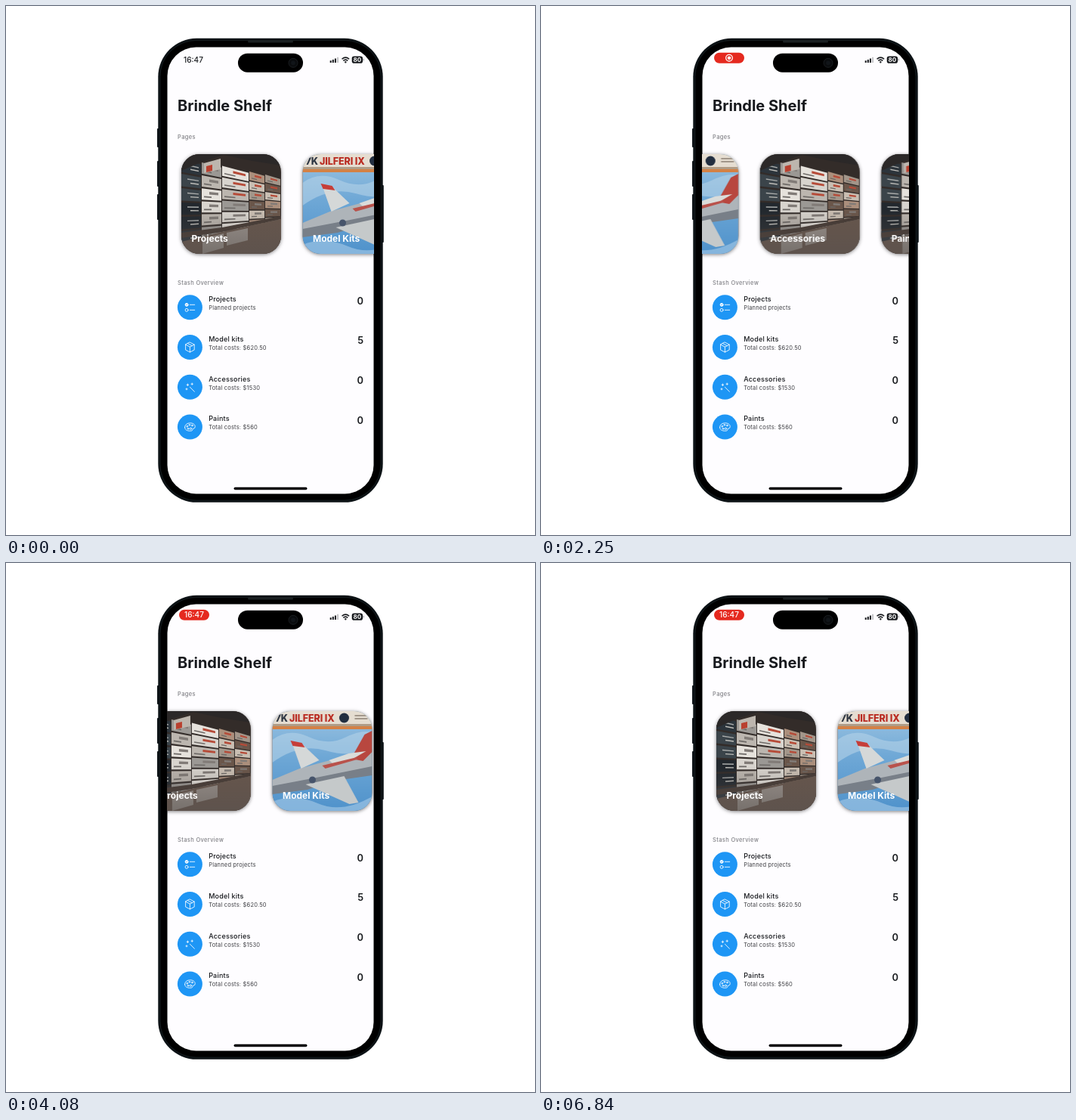
An HTML page that plays this animation: 700 px wide and 700 px high, repeating every 6870 ms.

```html
<!DOCTYPE html>
<html lang="en">
<head>
<meta charset="utf-8">
<title>Phone library carousel</title>
<style>
  html, body { margin: 0; width: 100%; height: 100%; overflow: hidden; background: #fff; }
  svg { display: block; width: 100vw; height: 100vh; }
  text { font-family: Inter, Roboto, sans-serif; fill: #17191d; }
  .title { font-size: 20px; font-weight: 700; }
  .section { font-size: 7.5px; font-weight: 500; letter-spacing: .36px; fill: #828287; }
  .name { font-size: 9px; font-weight: 500; letter-spacing: .2px; }
  .sub { font-size: 7.5px; letter-spacing: .2px; fill: #3e3f43; }
  .count { font-size: 12.8px; font-weight: 600; text-anchor: end; }
  .label { font-size: 12px; font-weight: 700; fill: #fff; }
  .clock { font-size: 10px; font-weight: 500; text-anchor: middle; }
  .icon { fill: none; stroke: #fff; stroke-width: .85; stroke-linecap: round; stroke-linejoin: round; }
  .shadow { filter: drop-shadow(0 1px 2.5px rgba(0, 0, 0, .5)); }
  .box-title { font-size: 12.5px; font-weight: 800; letter-spacing: -.1px; fill: #b92a20; }

  #strip, .before, .pill, .rec, .after { animation: 6870ms linear infinite both; }
  #strip { animation-name: scroll; }
  .before { animation-name: leave; }
  .pill { animation-name: enter; }
  .rec { animation-name: recOut; }
  .after { animation-name: timeIn; }

  @keyframes scroll {
    0%, 20.4% { transform: translateX(0); animation-timing-function: cubic-bezier(.4, 0, .7, .8); }
    32.75% { transform: translateX(-263px); animation-timing-function: cubic-bezier(.3, .5, .6, .9); }
    40.61% { transform: translateX(-356.5px); animation-timing-function: ease-out; }
    43.7% { transform: translateX(-364px); animation-timing-function: cubic-bezier(.5, 0, .7, .6); }
    52.84% { transform: translateX(-202.5px); animation-timing-function: cubic-bezier(.3, .45, .4, 1); }
    66%, 100% { transform: translateX(0); }
  }
  @keyframes leave { 0%, 6.5% { opacity: 1; } 8.5%, 100% { opacity: 0; } }
  @keyframes enter { 0%, 6.5% { opacity: 0; } 8.5%, 100% { opacity: 1; } }
  @keyframes recOut { 0%, 46% { opacity: 1; } 48%, 100% { opacity: 0; } }
  @keyframes timeIn { 0%, 46% { opacity: 0; } 48%, 100% { opacity: 1; } }
</style>
</head>
<body>
<svg viewBox="0 0 700 700">
  <defs>
    <clipPath id="screen"><rect x="213.5" y="54.5" width="273" height="591" rx="38"/></clipPath>
    <clipPath id="card"><rect width="132" height="132" rx="24"/></clipPath>
    <linearGradient id="shade" x2="0" y2="1">
      <stop offset=".55" stop-color="#55504e" stop-opacity="0"/>
      <stop offset="1" stop-color="#55504e" stop-opacity=".5"/>
    </linearGradient>
    <linearGradient id="sky" x2="0" y2="1">
      <stop offset="0" stop-color="#9dc4e2"/>
      <stop offset=".45" stop-color="#6fa8d6"/>
      <stop offset="1" stop-color="#4f92cb"/>
    </linearGradient>

    <g id="shelf">
      <rect width="132" height="132" fill="#332c29"/>
      <g id="boxes"></g>
      <path d="M0 0H132V15L94 9 56 1 28 10 0 22Z" fill="#2b2828"/>
      <path d="M30 12L52 6V20L30 25Z" fill="#bdb6ae"/>
      <path d="M33 16L41 14V22L33 24Z" fill="#b9402f"/>
      <path d="M0 116L58 102 132 86V132H0Z" fill="#67564c"/>
      <path d="M0 104L54 97 132 82V86L54 103 0 111Z" fill="#463a34"/>
      <path d="M28 112L56 105V124L28 132ZM60 104L88 98V114L60 121Z" fill="#99918b"/>
      <rect width="132" height="132" fill="url(#shade)"/>
    </g>

    <g id="jet">
      <rect width="132" height="132" fill="url(#sky)"/>
      <path d="M0 38Q22 22 48 34T96 35 132 28V50Q104 62 70 52T0 68Z" fill="#b5d2e8" opacity=".6"/>
      <path d="M0 120Q28 108 60 122T132 113V132H0Z" fill="#9cc4e4" opacity=".7"/>
      <path d="M0 91L36 76 91 61 132 52V83L88 88 48 101 0 108Z" fill="#aeb4b9"/>
      <path d="M0 99L58 88 132 73V85L90 91 46 104 0 110Z" fill="#787f88"/>
      <path d="M26 42L40 44 62 65 38 76Z" fill="#d5d8d8"/>
      <path d="M24 39L39 42 43 48 27 46Z" fill="#c63e39"/>
      <path d="M44 97L95 86 114 121 102 123Z" fill="#c5c9ca"/>
      <path d="M104 63L122 31 132 26V54L120 66Z" fill="#b8473f"/>
      <path d="M75 65L101 56 124 53 105 64 82 71Z" fill="#dadcda"/>
      <path d="M66 72L112 61V64L70 76Z" fill="#b9524b"/>
      <circle cx="53" cy="91" r="4.5" fill="#46546b"/>
      <rect width="132" height="18" fill="#e5ddd1"/>
      <rect y="17" width="132" height="3" fill="#af9c87"/>
      <rect y="20" width="132" height="4" fill="#d38146"/>
      <text x="4" y="14" font-size="12.5" font-weight="800" style="fill:#2d3542">7K</text>
      <text class="box-title" x="22.5" y="14">JILFERI IX</text>
      <circle cx="95" cy="9" r="6.5" fill="#222e40"/>
      <path d="M109 6H126M109 10H126" stroke="#8d8175" stroke-width="1.4"/>
    </g>
  </defs>

  <!-- phone body -->
  <g fill="#11171b">
    <rect x="200" y="162" width="3" height="25" rx="1"/>
    <rect x="200" y="205" width="3" height="34" rx="1"/>
    <rect x="200" y="249" width="3" height="34" rx="1"/>
    <rect x="497" y="237" width="2.8" height="76" rx="1"/>
  </g>
  <rect x="201.3" y="42.8" width="297.4" height="614" rx="51" fill="#0c1215"/>
  <rect x="204" y="45.5" width="292" height="608.6" rx="48" fill="#000" stroke="#151c1f" stroke-width=".8"/>
  <rect x="320" y="45.5" width="60" height="3" rx="1.5" fill="#1b2022"/>
  <rect x="213.5" y="54.5" width="273" height="591" rx="38" fill="#fefdff"/>

  <g clip-path="url(#screen)">
    <text class="title" x="227" y="139">Brindle Shelf</text>
    <text class="section" x="227" y="175.5">Pages</text>
    <g id="strip"></g>
    <text class="section" x="227" y="369.3">Stash Overview</text>
    <g id="rows"></g>
  </g>

  <!-- status bar -->
  <text class="clock before" x="248" y="74.7">16:47</text>
  <g class="pill">
    <rect x="229" y="61.7" width="40" height="14" rx="7" fill="#e5291f"/>
    <g class="rec">
      <circle cx="249" cy="68.7" r="4.3" fill="none" stroke="#fff" stroke-width="1.3"/>
      <circle cx="249" cy="68.7" r="2.3" fill="#fff"/>
    </g>
    <text class="clock after" x="249" y="72.3" style="fill:#fff">16:47</text>
  </g>
  <rect x="307" y="62.7" width="86" height="25" rx="12.5" fill="#000"/>
  <circle cx="380" cy="75.3" r="6" fill="#0a0c0e" stroke="#1a1d20"/>
  <circle cx="380" cy="75.3" r="2.8" fill="#111519"/>
  <path d="M429.7 75V72.3M432.8 75V71M435.9 75V69.4" stroke="#17191d" stroke-width="2"/>
  <path d="M439 75V67.7" stroke="#c3c3c6" stroke-width="2"/>
  <g fill="none" stroke="#17191d" stroke-width="1.5">
    <path d="M444.5 70.3Q449.3 66 454.1 70.3M446.3 72.4Q449.3 69.8 452.3 72.4"/>
    <circle cx="449.3" cy="74.3" r=".5"/>
  </g>
  <rect x="457.7" y="66.5" width="14.3" height="9.2" rx="2.8" fill="#17191d"/>
  <rect x="472.6" y="69.5" width="1" height="3" rx=".5" fill="#85868a"/>
  <text x="464.8" y="74" font-size="8" font-weight="700" text-anchor="middle" style="fill:#fff">80</text>
  <rect x="301.5" y="636.7" width="97" height="3.5" rx="1.75" fill="#050507"/>
</svg>

<script>
  const byId = id => document.getElementById(id);

  // Stacked boxes whose edges run toward a point beyond the right side.
  const edges = [0, 27, 54, 90, 111, 132];
  const tones = ['#d8d4ce', '#9b9894', '#e6e2dc', '#bcb6af'];
  const darks = ['#2c343b', '#22282e', '#3b444a'];
  const browns = ['#a3968a', '#c9beb2', '#6a564a', '#ab8f7c'];
  const slant = (x, y) => 76 + (y - 76) * (1 - x / 280);
  const quad = (x0, x1, y0, y1, fill) =>
    `<path fill="${fill}" d="M${x0} ${slant(x0, y0)}L${x1} ${slant(x1, y0)} ${x1} ${slant(x1, y1)} ${x0} ${slant(x0, y1)}Z"/>`;

  let shelf = '';
  for (let col = 0; col < 5; col++) {
    const palette = col === 0 ? darks : col > 2 ? browns : tones;
    const [left, right] = [edges[col], edges[col + 1] - 1];
    for (let row = 0; row < 6; row++) {
      const top = 7 + row * 19 - col * 3;
      shelf += quad(left, right, top, top + 16.5, palette[(row * 2 + col + (row >> 1)) % palette.length]);
      if (col === 0) {
        shelf += quad(8, 23, top + 5, top + 6.5, '#a9abaa') + quad(12, 23, top + 10, top + 11.5, '#c0bfba');
      } else {
        const accent = row < 3 && col > 1 ? '#b64b38' : '#817b77';
        const mid = (left + right) / 2;
        shelf += quad(mid - 3, right - 4, top + 4, top + 8, accent);
        shelf += quad(left + 3, mid, top + 11, top + 13, '#6d6966');
      }
    }
  }
  byId('boxes').innerHTML = shelf;

  const cards = [['Projects', 'shelf'], ['Model Kits', 'jet'], ['Accessories', 'shelf'], ['Paints', 'shelf']];
  byId('strip').innerHTML = cards.map(([label, photo], i) => `
    <g transform="translate(${232 + i * 160.5} 196)">
      <rect class="shadow" width="132" height="132" rx="24" fill="#77716e"/>
      <g clip-path="url(#card)"><use href="#${photo}"/></g>
      <text class="label" x="13.5" y="116">${label}</text>
    </g>`).join('');

  // Icons are centred on 0,0.
  const icons = {
    list: '<circle cx="-4.3" cy="-3.5" r="2" fill="#fff"/><path d="M-5.2-3.5l.7.7 1.2-1.4" stroke="#1e96f5" stroke-width=".6"/><circle cx="-4.3" cy="3.5" r="2"/><path d="M0-3.5H6.3M0 3.5H6.3"/>',
    cube: '<path d="M0-6.5L5.8-3.5V3.5L0 6.5-5.8 3.5V-3.5ZM-5.8-3.5L0-.4 5.8-3.5M0-.4V6.5M-3-5L2.9-2"/>',
    wand: '<path d="M0 0L6 6M-3-4.3V-1.7M-4.3-3H-1.7M2.8-5.3V-2.9M1.6-4.1H4M-4.4 1.6V3.6M-5.4 2.6H-3.4"/>',
    palette: '<path d="M-6.8.5C-6.8-3.2-3.5-5.2.3-5.2S6.8-3.4 6.8-.5 4.7 2 3.8 2.3 5 5.2.3 5.2-6.8 3.4-6.8.5Z"/><circle cx="-3.7" cy="-.8" r=".9"/><circle cx="-.6" cy="-2.7" r=".9"/><circle cx="3" cy="-2" r=".9"/><circle cx="-2.5" cy="2.3" r=".9"/><circle cx="1" cy="2.2" r="1.2"/>'
  };
  const rows = [
    ['Projects', 'Planned projects', 0, 'list'],
    ['Model kits', 'Total costs: $620.50', 5, 'cube'],
    ['Accessories', 'Total costs: $1530', 0, 'wand'],
    ['Paints', 'Total costs: $560', 0, 'palette']
  ];
  byId('rows').innerHTML = rows.map(([name, sub, count, icon], i) => `
    <g transform="translate(0 ${i * 52.75})">
      <circle cx="243.4" cy="398.8" r="16.5" fill="#1e96f5"/>
      <g class="icon" transform="translate(243.4 398.8)">${icons[icon]}</g>
      <text class="name" x="268.2" y="391">${name}</text>
      <text class="sub" x="268.2" y="402.2">${sub}</text>
      <text class="count" x="473" y="394.5">${count}</text>
    </g>`).join('');
</script>
</body>
</html>
```
